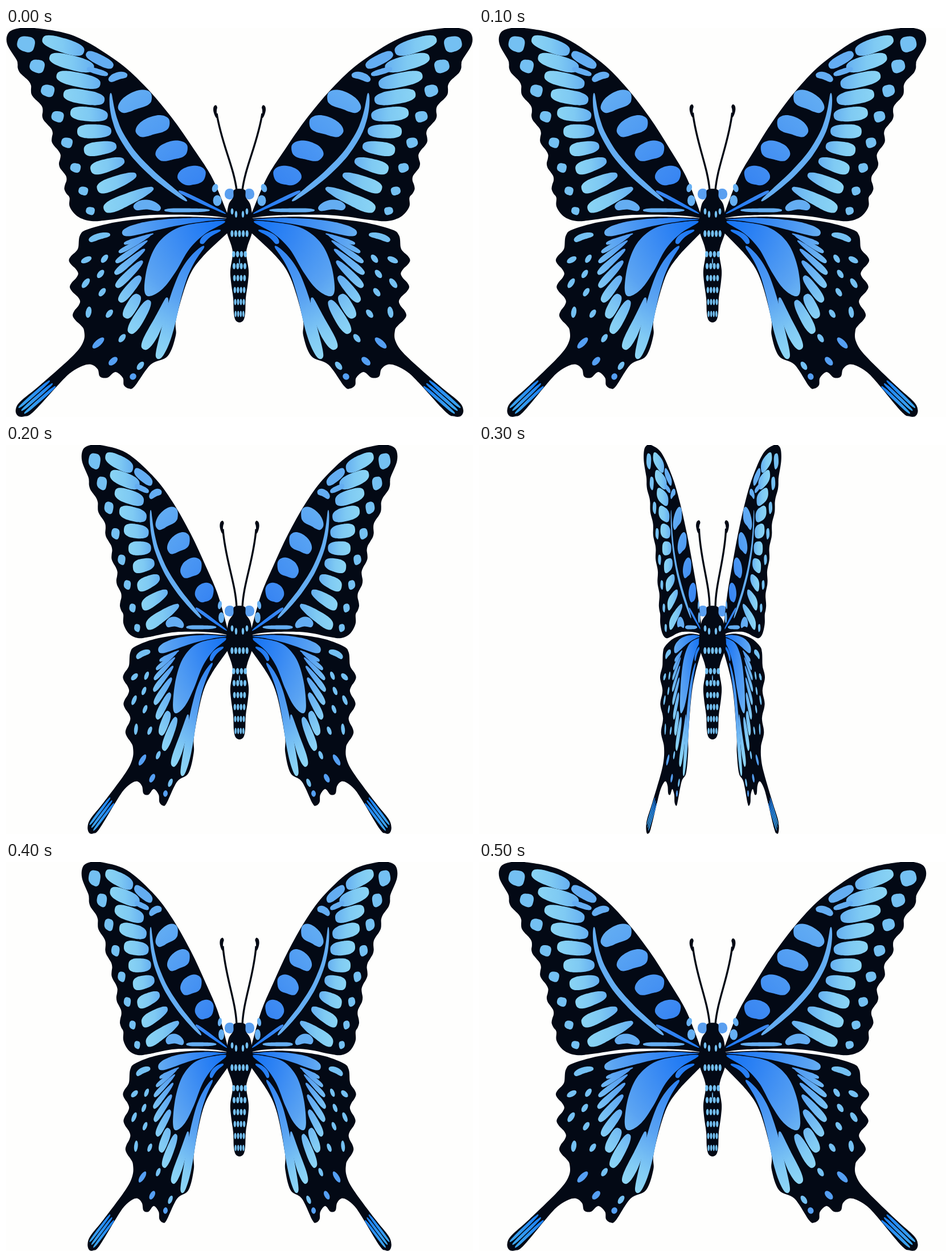
These frames come from a looping animation (820 by 683 pixels, 600 ms). An HTML page:

```html
<!DOCTYPE html>
<html lang="en">
<head>
<meta charset="utf-8">
<title>Butterfly</title>
<style>
  html, body { margin: 0; width: 100%; height: 100%; overflow: hidden; background: #fefefd; }
  svg { display: block; width: 100%; height: 100%; }
</style>
</head>
<body>
<svg viewBox="0 0 820 683">
  <defs>
    <radialGradient id="hindFill" gradientUnits="userSpaceOnUse" cx="392" cy="335" r="280">
      <stop offset="0" stop-color="#0f70f5"/>
      <stop offset=".3" stop-color="#3587f3"/>
      <stop offset=".6" stop-color="#5aa3f2"/>
      <stop offset=".85" stop-color="#82cbf4"/>
      <stop offset="1" stop-color="#90d8f6"/>
    </radialGradient>
    <radialGradient id="patchFill" gradientUnits="userSpaceOnUse" cx="392" cy="333" r="300">
      <stop offset="0" stop-color="#1976f5"/>
      <stop offset=".3" stop-color="#3a87f2"/>
      <stop offset="1" stop-color="#66b0f3"/>
    </radialGradient>
    <linearGradient id="cellFill">
      <stop offset="0" stop-color="#8ad4f4"/>
      <stop offset=".5" stop-color="#7fcaf3"/>
      <stop offset="1" stop-color="#66b0f1"/>
    </linearGradient>
    <linearGradient id="tailFill" x1="0" y1="1" x2="1" y2="0">
      <stop offset="0" stop-color="#3fa8f0"/>
      <stop offset="1" stop-color="#1b80f4"/>
    </linearGradient>
  </defs>
  <g id="half">
    <rect x="384" y="282" width="18" height="19" rx="8.5" fill="#5a9ff0"/>
    <g id="antenna"></g>
    <g id="wing"></g>
  </g>
  <use href="#half" transform="translate(820) scale(-1 1)"/>
  <g id="body"></g>
</svg>
<script>
const INK = '#030915', SKY = '#74c0f2', MID = '#64adf2', DEEP = '#559ff3';
const HIND = 'url(#hindFill)', PATCH = 'url(#patchFill)', CELL = 'url(#cellFill)';
const $ = id => document.getElementById(id);
const mix = (a, b, t) => a + (b - a) * t;
const range = n => [...Array(n).keys()];
const power = (v, e) => Math.sign(v) * Math.abs(v) ** e;

// Curve through a few evenly timed key points.
const guide = (...keys) => t => {
  const last = keys.length - 1, sum = [0, 0];
  keys.forEach(([x, y], j) => {
    let w = 1;
    keys.forEach((_, k) => { if (k !== j) w *= (t * last - k) / (j - k); });
    sum[0] += w * x;
    sum[1] += w * y;
  });
  return sum;
};

// Smooth closed outline through points; a doubled point makes a corner.
function shape(fill, p) {
  const n = p.length, at = i => p[(i + n) % n];
  const d = p.map((b, i) => {
    const a = at(i - 1), c = at(i + 1), e = at(i + 2);
    const h1 = b.map((v, k) => (v + (c[k] - a[k]) / 6).toFixed(1));
    const h2 = c.map((v, k) => (v - (e[k] - b[k]) / 6).toFixed(1));
    return `C${h1} ${h2} ${c}`;
  });
  return `<path fill="${fill}" d="M${p[0]}${d.join('')}Z"/>`;
}

// Rounded strip along a curve, half-width going from wa to wb.
function ribbon(fill, curve, wa, wb = wa, round = .75) {
  return shape(fill, range(24).map(k => {
    const a = k / 24 * 2 * Math.PI;
    const s = (1 - power(Math.cos(a), round)) / 2;
    const w = mix(wa, wb, s) * power(Math.sin(a), round);
    const [x, y] = curve(s), [x0, y0] = curve(s - .01), [x1, y1] = curve(s + .01);
    const len = Math.hypot(x1 - x0, y1 - y0);
    return [x - w * (y1 - y0) / len, y + w * (x1 - x0) / len];
  }));
}

// n strips spanning two guides; size(t) gives both half-widths and an upward bow.
const loft = (fill, n, from, to, size) => range(n).map(i => {
  const t = i / (n - 1), a = from(t), b = to(t), [wa, wb, bow = 0] = size(t);
  const m = [(a[0] + b[0]) / 2 - bow / 2, (a[1] + b[1]) / 2 - bow];
  return ribbon(fill, guide(a, m, b), wa, wb);
}).join('');

// n tilted ovals along a curve; look(t) gives radii and turn.
const oval = (fill, [x, y], rx, ry, turn = 0) =>
  `<ellipse fill="${fill}" rx="${rx}" ry="${ry}" transform="translate(${x} ${y}) rotate(${turn})"/>`;
const beads = (fill, n, curve, look) => range(n).map(i =>
  oval(fill, curve(i / (n - 1)), ...look(i / (n - 1)))).join('');

// Scalloped edge: a guide with a cosine ripple in x.
const scallop = (curve, n, depth, turns) => range(n + 1).map(i => {
  const [x, y] = curve(i / n);
  return [x + depth * Math.cos(turns * 2 * Math.PI * i / n), y];
});

function foreWing() {
  const edge = [[2, 28],
    ...scallop(guide([14, 55], [76, 177], [109, 298]), 32, 4, 5.86),
    [112, 314], [126, 331], [150, 339], [180, 337], [250, 328.5], [345, 329],
    [392, 334], [392, 334], [363, 265], [330, 213], [290, 156], [242, 100],
    [192, 56], [120, 14], [50, 0], [20, 1], [4, 9]];
  return shape(INK, edge) +
    loft(CELL, 10, guide([64, 19], [119, 165], [172, 319]),
      guide([137, 42], [173, 127], [194, 207], [259, 281]),
      t => [mix(12, 14, t), mix(13, 7, t * t)]) +
    loft(PATCH, 4, guide([200, 146], [248, 208], [306, 270]), guide([256, 122], [350, 260]),
      t => [mix(13, 16, t), 17, 6]) +
    range(8).map(i => {
      const [x, y] = guide([35, 28], [79, 125], [117, 231], [148, 321])(i / 7);
      const r = mix(15, 7.5, (i / 7) ** .6);
      return ribbon(SKY, guide([x - r, y - r / 4], [x + r, y + r / 4]), r * .8, r);
    }).join('') +
    ribbon(MID, guide([184, 114], [203, 190], [251, 250], [318, 304]), 5, 5.5) +
    ribbon(MID, guide([141, 44], [188, 68]), 9) +
    ribbon(MID, guide([142, 71], [179, 82]), 5) +
    ribbon(MID, guide([181, 93], [197, 84], [213, 84]), 7, 6) +
    ribbon(MID, guide([225, 317], [247, 310], [271, 319]), 9, 8) +
    ribbon(MID, guide([278, 320], [358, 320]), 4, 3) +
    ribbon(PATCH, guide([303, 286], [386, 326]), 4, 2) +
    oval(PATCH, [367, 281], 5, 7.5, 20) +
    oval(PATCH, [371, 303], 7.5, 9.5);
}

function hindWing() {
  const edge = [[392, 334], [392, 334], [300, 331.5], [205, 339], [145, 353], [130, 364],
    ...scallop(guide([119, 385], [120, 455], [129, 531]), 18, 8, 3),
    [136, 550], [118, 575], [60, 627], [25, 656], [17, 671], [21, 681], [32, 682],
    [48, 674], [95, 623], [115, 604], [135, 593], [150, 591], [161, 599], [165, 612],
    [178, 614], [192, 604], [205, 614], [207, 627], [216, 633], [226, 629], [254, 591],
    [284, 576], [298, 540], [299, 510], [320, 440], [345, 402], [392, 357], [392, 357]];
  const heart = [[385, 340], [350, 341], [310, 348], [283, 362], [262, 385], [248, 420],
    [243, 460], [252, 471], [275, 458], [298, 428], [322, 388], [350, 361]];
  return shape(INK, edge) + shape(HIND, heart) +
    ribbon(HIND, guide([204, 361], [290, 342], [386, 336]), 13, 1) +
    ribbon(HIND, guide([343, 379], [354, 365], [377, 355]), 6, 3) +
    ribbon(HIND, guide([348, 383], [309, 440], [289, 508], [266, 581]), 6, 13) +
    ribbon(HIND, guide([283, 473], [268, 515], [241, 564]), 5, 13) +
    ribbon(HIND, guide([252, 478], [236, 505], [217, 536]), 8, 11) +
    loft(HIND, 7, guide([207, 379], [191, 432], [209, 509]),
      guide([259, 361], [244, 388], [233, 468]),
      t => [mix(4.5, 10, t), mix(2, 10, t * t)]) +
    ribbon(SKY, guide([146, 374], [163, 366], [183, 363]), 6, 5) +
    beads(SKY, 3, guide([141, 407], [140, 448], [145, 499]), t => [10, 5, mix(-25, -80, t)]) +
    beads(SKY, 6, guide([173, 405], [174, 482], [236, 593]), () => [8.5, 4.8, -52]) +
    beads(DEEP, 3, guide([162, 553], [188, 585], [223, 612]), t => [mix(13, 6, t), 5.5, -42]) +
    [-5, 0, 5].map(k =>
      ribbon('url(#tailFill)', guide([27 + k, 672 + k], [82 + k, 624 + k]), 2.8)).join('');
}

function bodyParts() {
  const side = [[419, 284], [421, 297], [429, 310], [433, 335], [433, 356], [424, 383],
    [422, 398], [426, 425], [425, 445], [421, 475], [420, 500], [417, 513]];
  const other = side.map(([x, y]) => [820 - x, y]).reverse();
  const row = (y, n, gap, rx, ry) =>
    beads(SKY, n, guide([410 - gap * (n - 1) / 2, y], [410 + gap * (n - 1) / 2, y]), () => [rx, ry]);
  return shape(INK, [...side, [410, 517], ...other]) +
    row(322, 2, 26, 2.4, 5.6) + row(327, 2, 12, 2.2, 6) + row(331, 1, 0, .9, 6).replace(/NaN/g, 410) +
    row(361, 5, 6.6, 2.6, 6) +
    range(6).map(i => row(397 + 21 * i, 4, 6.8 - .45 * i, 2.8 - .2 * i, 5.6)).join('');
}

$('wing').innerHTML = hindWing() + foreWing();
$('antenna').innerHTML =
  `<path d="M405 285C400 243 378 202 370 150" fill="none" stroke="${INK}" stroke-width="3.4"/>` +
  ribbon(INK, guide([370, 137], [367, 144], [370, 158]), 4, 2);
$('body').innerHTML = bodyParts();

// Wings fold about the body in held steps while the antennae close in evenly.
const STEP = 100, HINGE = 392;
const spread = [1, .9133, .663, .263];
let shown = -1;
function draw(now) {
  const beat = Math.floor(now / STEP) % 6;
  const pose = 3 - Math.abs(3 - beat);
  if (pose === shown) return;
  shown = pose;
  const s = spread[pose];
  $('wing').setAttribute('transform', `matrix(${s} 0 0 1 ${HINGE * (1 - s)} 0)`);
  $('antenna').setAttribute('transform', `rotate(${pose * 2.3} 405 284)`);
}
const start = performance.now();
function tick() {
  draw(performance.now() - start);
  requestAnimationFrame(tick);
}
draw(0);
requestAnimationFrame(tick);
</script>
</body>
</html>
```
